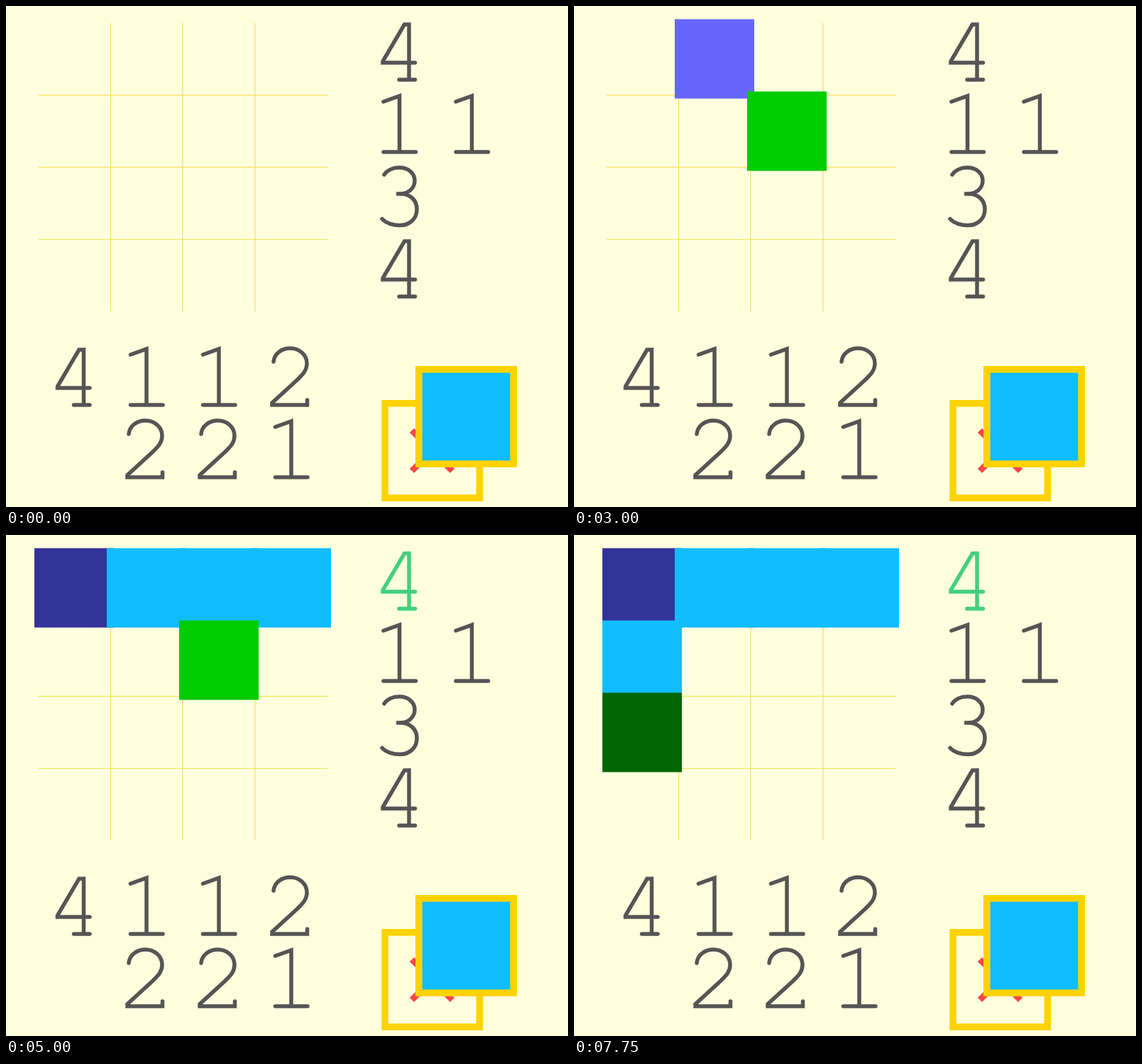
An HTML page that plays this animation: 792 px wide and 707 px high, repeating every 8 s.

```html
<!DOCTYPE html>
<html lang="en">
<head>
<meta charset="utf-8">
<title>Number grid puzzle</title>
<style>
  :root {
    --player1: #6666ff; --player1-on: #333399;
    --player2: #00cc00; --player2-on: #006600;
    --filled: #11bdff; --gold: #ffd200; --paper: #ffffde;
  }
  html, body { margin: 0; width: 100%; height: 100%; overflow: hidden; background: var(--paper); }
  svg { display: block; width: 792px; height: 707px; }

  .lines { stroke: #fbe05a; stroke-width: 1.2; }
  .clues { fill: none; stroke: #555; stroke-width: 5.5; stroke-linecap: round; }
  .frame { stroke: var(--gold); stroke-width: 9.6; }
  .cross { stroke: #ff4444; stroke-width: 8.8; }

  .cells rect { width: 112px; height: 112px; fill: transparent; }
  .cells rect, #solved { animation: 8s step-end infinite; }

  #c00 { animation-name: c00; }
  #c10 { animation-name: c10; }
  #c20 { animation-name: c20; }
  #c30 { animation-name: c30; }
  #c01 { animation-name: c01; }
  #c11 { animation-name: c11; }
  #c21 { animation-name: c21; }
  #c02 { animation-name: c02; }
  #solved { animation-name: solved; }

  /* 3.125% is one 250 ms beat */
  @keyframes c00 {
    59.375% { fill: var(--player1); }
    62.5% { fill: var(--player1-on); }
  }
  @keyframes c10 {
    37.5% { fill: var(--player1); }
    40.625% { fill: transparent; }
    53.125% { fill: var(--player1); }
    56.25% { fill: var(--player1-on); }
    59.375% { fill: var(--filled); }
  }
  @keyframes c20 {
    40.625% { fill: var(--player1); }
    43.75% { fill: transparent; }
    50% { fill: var(--player1); }
    53.125% { fill: var(--filled); }
  }
  @keyframes c30 {
    43.75% { fill: var(--player1); }
    46.875% { fill: var(--player1-on); }
    50% { fill: var(--filled); }
  }
  @keyframes c01 {
    81.25% { fill: var(--player2); }
    87.5% { fill: var(--player2-on); }
    93.75% { fill: var(--filled); }
  }
  @keyframes c11 {
    9.375% { fill: var(--player1); }
    37.5% { fill: transparent; }
    75% { fill: var(--player2); }
    81.25% { fill: transparent; }
  }
  @keyframes c21 {
    25% { fill: var(--player2); }
    75% { fill: transparent; }
  }
  @keyframes c02 {
    93.75% { fill: var(--player2); }
    96.875% { fill: var(--player2-on); }
  }
  @keyframes solved {
    62.5% { stroke: #44d07b; }
  }
</style>
</head>
<body>
<svg viewBox="0 0 792 707" role="img" aria-label="Row clues 4, 1 1, 3, 4. Column clues 4, 1 2, 1 2, 2 1.">
  <defs>
    <path id="d1" d="M4 10L26.5 2V81M4 81H49.5"/>
    <path id="d2" d="M2 20C3 9 13 1 25.5 1C38 1 49 10 49 22.5C49 33 42 39 36 45L0 78V81H49.5V74"/>
    <path id="d3" d="M5 11C9 5 17 1 26 1C39 1 48 9 48 19.5C48 30 39 38 27 38H22H27C42 38 51 47 51 60C51 73 41 82.5 27 82.5C17 82.5 7 79 2 73.5"/>
    <path id="d4" d="M48.5 57H3V55L33.5 3H40V81M26 81H48.5"/>
  </defs>

  <path class="lines" d="M147.5 24V431M249 24V431M351 24V431M46 125.8H453M46 227.7H453M46 329.5H453"/>

  <!-- row by row, so later cells overlap earlier ones -->
  <g class="cells">
    <rect id="c00" x="40" y="18.6"/>
    <rect id="c10" x="142" y="18.6"/>
    <rect id="c20" x="244" y="18.6"/>
    <rect id="c30" x="346" y="18.6"/>
    <rect id="c01" x="40" y="120.6"/>
    <rect id="c11" x="142" y="120.6"/>
    <rect id="c21" x="244" y="120.6"/>
    <rect id="c02" x="40" y="222.6"/>
  </g>

  <g class="clues">
    <use id="solved" href="#d4" x="528" y="23"/>
    <use href="#d1" x="528" y="125"/>
    <use href="#d1" x="630" y="125"/>
    <use href="#d3" x="528" y="227"/>
    <use href="#d4" x="528" y="329"/>

    <use href="#d4" x="69.5" y="482"/>
    <use href="#d1" x="171.5" y="482"/>
    <use href="#d1" x="273.5" y="482"/>
    <use href="#d2" x="375" y="482"/>
    <use href="#d2" x="171" y="584"/>
    <use href="#d2" x="273" y="584"/>
    <use href="#d1" x="375.5" y="584"/>
  </g>

  <rect class="frame" x="534" y="560.8" width="133.4" height="133.4" fill="#ffffde"/>
  <path class="cross" d="M572 599L629 656M629 599L572 656"/>
  <rect class="frame" x="581.8" y="512.8" width="133.4" height="133.4" fill="#11bdff"/>
</svg>
</body>
</html>
```
